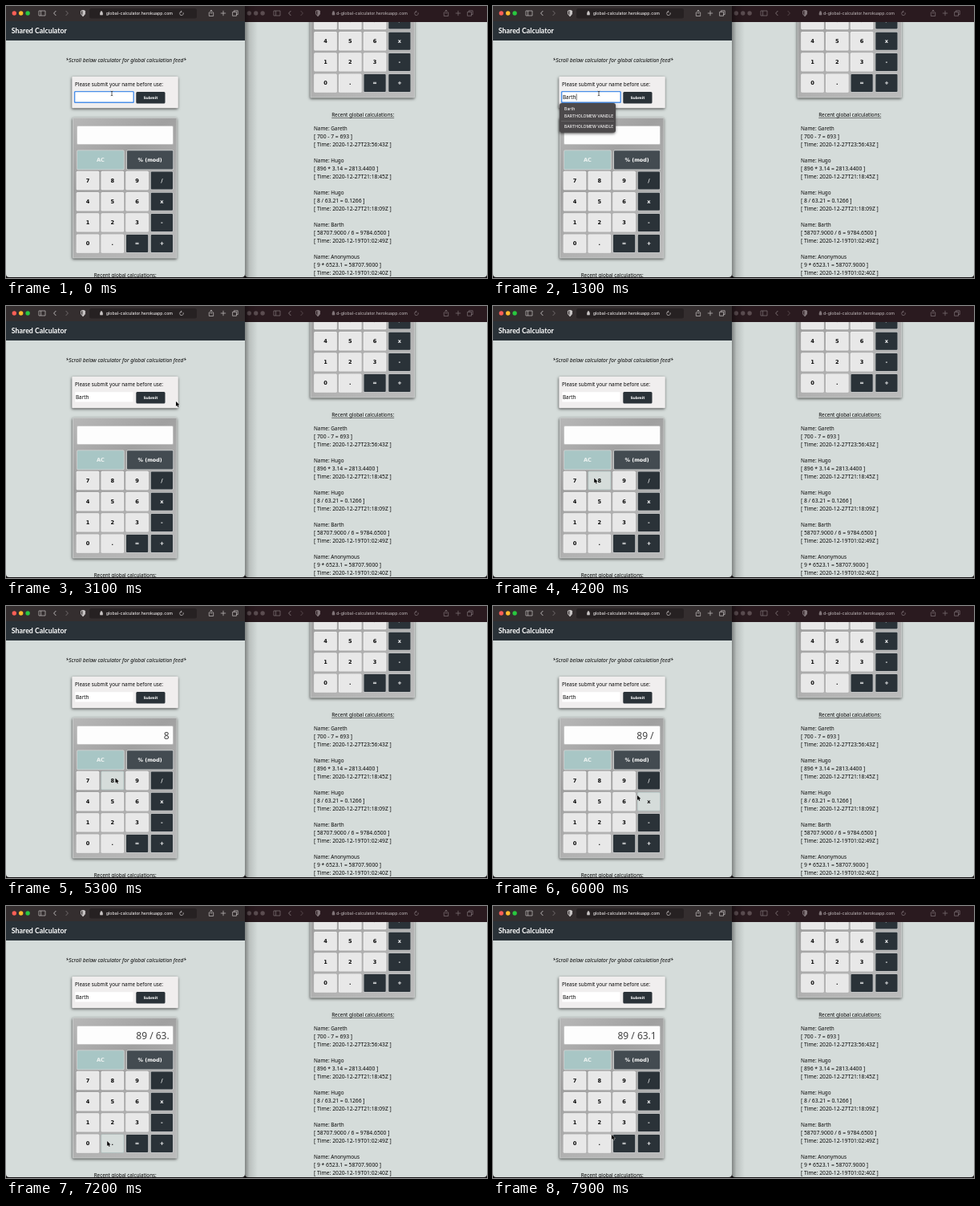
An HTML page with a canvas that plays this animation: 600x339 px, repeating every 8 s.

```html
<!DOCTYPE html>
<html lang="en">
<head>
<meta charset="utf-8">
<title>Shared Calculator</title>
<style>
html, body { margin: 0; width: 100%; height: 100%; overflow: hidden; background: #151113; }
canvas { display: block; width: 600px; height: 339px; }
</style>
</head>
<body>
<canvas id="stage"></canvas>
<script>
const LOOP = 8000, TICK = 100, GLIDE = 300;
const WIDTH = 600, HEIGHT = 339, SPLIT = 298, BOTTOM = 338;
const canvas = document.getElementById('stage');
const ratio = window.devicePixelRatio || 1;
canvas.width = WIDTH * ratio;
canvas.height = HEIGHT * ratio;
const ctx = canvas.getContext('2d');

const SANS = '"Noto Sans", "Open Sans", sans-serif';
const WIDE = '"DejaVu Sans", sans-serif';
const UI = 'Inter, sans-serif';
const PAGE = '#d5dcda', SLATE = '#2a3238', INK = '#080808';

const USER = 'Barth';
const FULL_NAME = 'BARTHOLOMEW VANDLE';
const FEED = [
  ['Gareth', '700 - 7 = 693', '2020-12-27T23:56:43Z'],
  ['Hugo', '896 * 3.14 = 2813.4400', '2020-12-27T21:18:45Z'],
  ['Hugo', '8 / 63.21 = 0.1266', '2020-12-27T21:18:09Z'],
  [USER, '58707.9000 / 6 = 9784.6500', '2020-12-19T01:02:49Z'],
  ['Anonymous', '9 * 6523.1 = 58707.9000', '2020-12-19T01:02:40Z']
];
const KEYS = '789/456x123-0.=+';

// Pointer stops: arrival time, key or point, time the key is pressed
const STOPS = [
  [0, [132, 109]], [1800, [189, 112]], [3100, [212, 119]], [3600, [156, 166]],
  [4200, '8', 5000], [5500, '9', 5500], [5800, '/', 5800], [6000, [180, 236]],
  [6300, '6', 6400], [6700, '3', 6800], [7100, '.', 7100], [7500, '1', 7500],
  [7900, [148, 285]]
];

const clamp = (v, lo, hi) => Math.min(hi, Math.max(lo, v));

function keyCorner(key) {
  const i = KEYS.indexOf(key);
  return [88.4 + 30.8 * (i % 4), 206.5 + 26.2 * Math.floor(i / 4)];
}

function place(target) {
  if (Array.isArray(target)) return target;
  const [x, y] = keyCorner(target);
  return [x + 7, y + 8];
}

function pointerAt(t) {
  const next = STOPS.findIndex(stop => stop[0] > t);
  if (next < 0) return place(STOPS.at(-1)[1]);
  const [left, from] = STOPS[next - 1], [arrive, to] = STOPS[next];
  const start = Math.max(left, arrive - GLIDE);
  const k = clamp((t - start) / (arrive - start), 0, 1);
  const a = place(from), b = place(to);
  return a.map((v, i) => v + (b[i] - v) * k);
}

const displayAt = t => STOPS.filter(stop => stop[2] <= t)
  .map(stop => stop[1] === '/' ? ' / ' : stop[1]).join('');

const typedAt = t => USER.slice(0, clamp(Math.floor((t - 200) / 130) + 1, 0, USER.length));

function text(s, x, y, size, { color = INK, font = SANS, style = '', align = 'left' } = {}) {
  ctx.font = `${style} ${size}px ${font}`;
  ctx.fillStyle = color;
  ctx.textAlign = align;
  ctx.fillText(s, x, y);
}

function box(x, y, w, h, fill, r = 0) {
  ctx.beginPath();
  ctx.roundRect(x, y, w, h, r);
  ctx.fillStyle = fill;
  ctx.fill();
}

function framed(x, y, w, h, fill, border, edge = 0.7) {
  box(x - edge, y - edge, w + 2 * edge, h + 2 * edge, border, 1.5);
  box(x, y, w, h, fill, 1);
}

function shadowed(draw) {
  ctx.save();
  ctx.shadowColor = 'rgba(0,0,0,.65)';
  ctx.shadowBlur = 3.5 * ratio;
  ctx.shadowOffsetX = -0.4 * ratio;
  ctx.shadowOffsetY = 1.3 * ratio;
  draw();
  ctx.restore();
}

function shape(d, x, y, color, width = 0.7, fill) {
  ctx.save();
  ctx.translate(x, y);
  const path = new Path2D(d);
  ctx.strokeStyle = color;
  ctx.lineWidth = width;
  ctx.stroke(path);
  if (fill) {
    ctx.fillStyle = fill;
    ctx.fill(path);
  }
  ctx.restore();
}

function button(label, x, y, w, h, size, fill, color, [px, py], border) {
  const over = px >= x - 1 && px <= x + w && py >= y && py <= y + h;
  framed(x, y, w, h, over ? PAGE : fill, over ? '#b5c8c6' : border || fill);
  text(label, x + w / 2, y + h / 2 + size * 0.36, size,
    { color: over ? INK : color, font: WIDE, style: 'bold', align: 'center' });
}

function calculator(value, pointer) {
  const metal = ctx.createLinearGradient(83, 139, 214, 315);
  ['#b8b8b8', '#a0a0a0', '#b2b2b2', '#bcbcbc'].forEach((c, i) => metal.addColorStop(i / 3, c));
  shadowed(() => box(83, 139, 130.5, 175.5, '#c6c9c8', 1));
  box(84, 140, 128.5, 173.5, metal);
  framed(89, 150, 119, 22, '#fdfdfd', '#cfcfcf');

  const rim = '#d6d9d9';
  button('AC', 89, 180.3, 57.8, 23.2, 6.6, '#a8c6c5', '#eef3f2', pointer, rim);
  button('% (mod)', 151, 180.3, 57.3, 23.2, 6.4, '#434b51', '#fff', pointer, rim);
  for (const key of KEYS) {
    const dark = '/x-=+'.includes(key);
    button(key, ...keyCorner(key), 27.2, 22, 6.6,
      dark ? SLATE : '#e8e8e8', dark ? '#fff' : INK, pointer, dark ? '#c3c6c7' : '#f0f0f0');
  }
  text(value, 203.7, 165.5, 12, { color: '#424242', align: 'right' });
}

function form(typed, focused, pointer) {
  shadowed(() => box(82.3, 88, 132.5, 39.3, '#f0eeee', 1));
  text('Please submit your name before use:', 86, 99.7, 6.32);
  if (focused) box(84.9, 105.9, 75, 15, '#4a8fe8', 1.5);
  box(86.3, 107.3, 72.2, 12.2, '#fff', 0.5);
  text(typed, 87, 115.8, 6.3);
  if (focused && typed) box(87.4 + ctx.measureText(typed).width, 109.5, 0.6, 8, INK);
  button('Submit', 163, 107.8, 34.8, 13, 4.5, SLATE, '#fff', pointer);
}

function feed() {
  const title = 'Recent global calculations:';
  text(title, 148.7, 338, 6.27, { align: 'center' });
  const w = ctx.measureText(title).width;
  box(148.7 - w / 2, 338.9, w, 0.5, INK);
  FEED.forEach(([name, sum, time], i) => {
    [`Name: ${name}`, `[ ${sum} ]`, `[ Time: ${time} ]`].forEach((s, j) =>
      text(s, 87.5, 354.7 + 40 * i + 10 * j, j ? 6.75 : 6.35));
  });
}

function page({ x, left, right, top, scroll, typed = '', focused, value = '', pointer }) {
  ctx.save();
  ctx.beginPath();
  ctx.roundRect(left, top, right - left, BOTTOM - top, [0, 0, 4, 4]);
  ctx.clip();
  ctx.fillStyle = PAGE;
  ctx.fillRect(left, top, right - left, HEIGHT);
  ctx.translate(x, -scroll);
  box(0, 18, 300, 25, SLATE);
  text('Shared Calculator', 6.8, 33.8, 8.8, { color: '#fff', font: 'Lato, sans-serif', style: 'bold' });
  text('*Scroll below calculator for global calculation feed*', 149.7, 70.4, 6.55,
    { style: 'italic', align: 'center' });
  form(typed, focused, pointer);
  calculator(value, pointer);
  feed();
  ctx.restore();
}

function toolbar(x, left, right, height, active) {
  const ink = active ? '#c6c2c2' : '#82767a', dim = active ? '#777071' : '#584b4e';
  box(left, 0, right - left, height, active ? '#342e2f' : '#2a1a1f');
  const lights = active ? ['#fe5f57', '#febc2e', '#28c840'] : Array(3).fill('#5b4c50');
  lights.forEach((c, i) => box(x + 7.6 + 8.4 * i, 6.3, 5.4, 5.4, c, 2.7));
  if (active) box(104, 3, 134, 12.5, '#262122', 2.5);

  shape('M-4-3h8v6h-8zM-1.4-3v6', x + 45, 9, ink);
  shape('M1.4-3l-2.8 3 2.8 3', x + 61, 9, ink, 0.9);
  shape('M-1.4-3l2.8 3-2.8 3', x + 76, 9, dim, 0.9);
  shape('M0-3.7l2.6 1-.2 3.6L0 3.7z', x + 96, 9, ink, 0);
  shape('M0-3.7l-2.6 1 .2 3.6L0 3.7l2.4-2.8.2-3.6zM0-3.7v7.4L-2.4.9v-3.6z', x + 96, 9, ink, 0.7, ink);
  shape('M-1.5-.5h3v2.6h-3zM-1-.5v-1a1 1 0 0 1 2 0v1', x + (active ? 119 : 115.5), 9, ink, 0.6, ink);
  text((active ? '' : 'd-') + 'global-calculator.herokuapp.com', x + 208, 11, 5.25,
    { color: active ? '#e8e5e5' : '#b3abad', font: UI, style: '500', align: 'right' });
  shape('M2-1A2.3 2.3 0 1 1 0-2.2M-1-3.4l1.3 1.2L-1-1', x + 219, 9.2, ink);
  ['M-1.3-1h-1.4v4.5h5.4V-1H1.3M0 1v-5M-1.5-2.5L0-4l1.5 1.5',
    'M-3.2 0h6.4M0-3.2v6.4',
    'M-3.4-1.6h4.9v4.9h-4.9zM-1.6-1.6v-1.6h4.8v4.8H1.5'
  ].forEach((d, i) => shape(d, x + 256 + 15 * i, 9, ink));
}

function windowShadow() {
  const fade = ctx.createLinearGradient(SPLIT, 0, SPLIT + 16, 0);
  fade.addColorStop(0, 'rgba(0,0,0,.4)');
  fade.addColorStop(0.35, 'rgba(0,0,0,.13)');
  fade.addColorStop(1, 'rgba(0,0,0,0)');
  box(SPLIT, 0, 16, HEIGHT, fade);
}

function suggestions() {
  const style = { color: '#f2f0f0', font: UI, style: '500' };
  shadowed(() => box(83, 121, 70, 36.8, '#4c494b', 3));
  text(USER, 89, 130, 5.2, style);
  [138.9, 152].forEach(y => text(FULL_NAME, 89, y, 5, style));
  box(85, 143.5, 66, 0.5, '#7b7879');
}

function cursor([x, y]) {
  const overField = x > 86 && x < 160 && y > 105 && y < 121;
  if (overField) shape('M-1.3-2.8l1.3.5 1.3-.5M0-2.3v4.6M-1.3 2.8L0 2.3l1.3.5', x, y, '#222');
  else shape('M0 0v6l1.4-1.2 1 2.2 1-.5-.9-2.1 1.8-.1z', x, y, '#eee', 0.8, '#000');
}

function render(now) {
  const t = Math.floor(now % LOOP / TICK) * TICK;
  const hidden = t >= 200 && t < 1300;
  const away = [-99, -99], pointer = hidden ? away : pointerAt(t);
  ctx.setTransform(ratio, 0, 0, ratio, 0, 0);
  box(0, 0, WIDTH, HEIGHT, '#151113');

  page({ x: 296.5, left: SPLIT, right: WIDTH, top: 20, scroll: 200, pointer: away });
  toolbar(293, SPLIT, WIDTH, 20, false);
  windowShadow();

  page({
    x: 0, left: 0, right: SPLIT, top: 19, scroll: 0, pointer,
    typed: typedAt(t), focused: t < 2200, value: displayAt(t)
  });
  toolbar(0, 0, SPLIT, 19, true);
  if (t >= 1300 && t < 2200) suggestions();
  cursor(pointer);
  requestAnimationFrame(() => render(performance.now()));
}
render(0);
</script>
</body>
</html>
```
